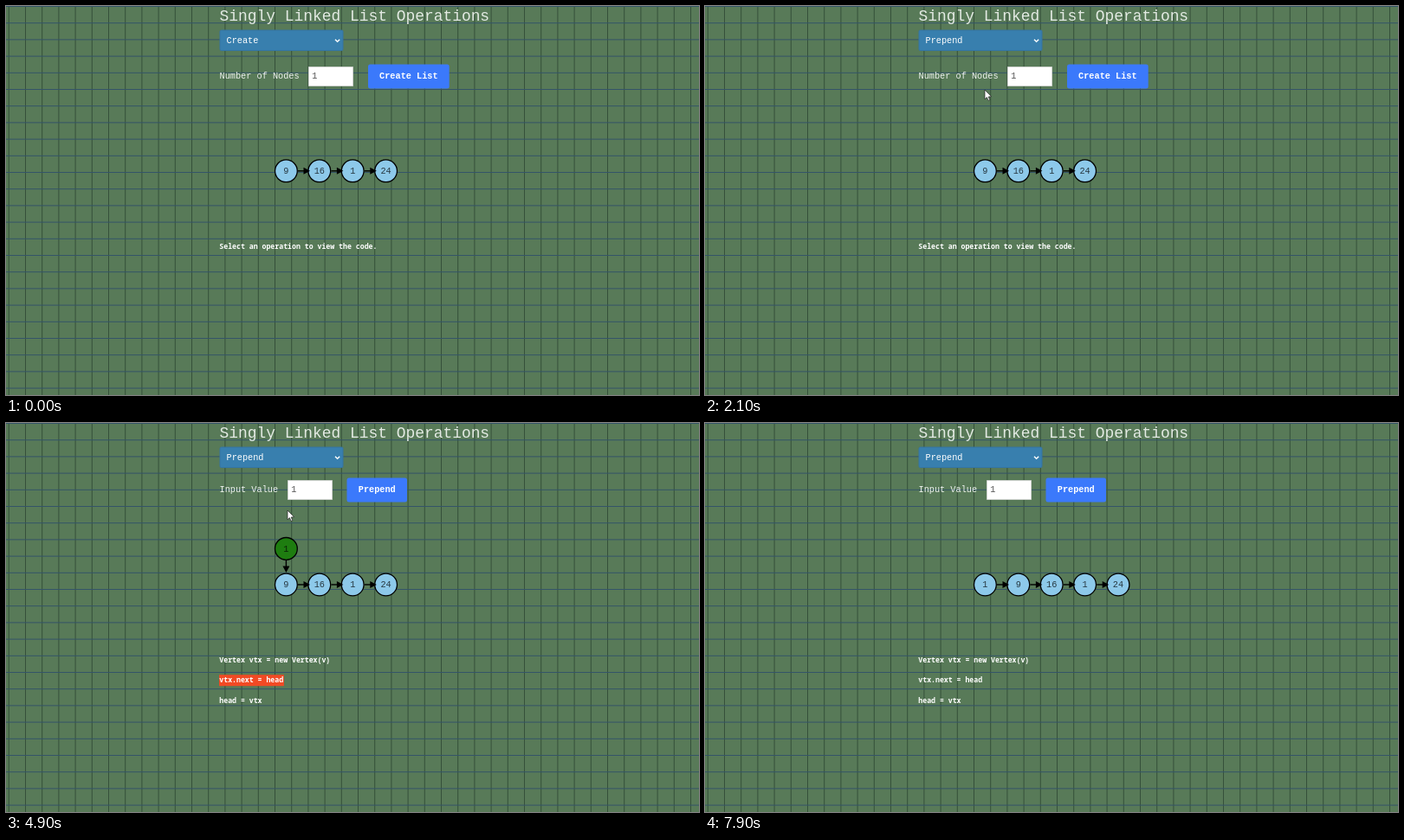
These frames come from a looping animation (800x450 px, 8.3 s). An HTML page with a canvas:

```html
<!DOCTYPE html>
<html lang="en">
<head>
<meta charset="utf-8">
<title>Singly Linked List Operations</title>
<style>
  html, body { margin: 0; width: 100%; height: 100%; overflow: hidden; background: #587a58; }
  canvas { display: block; }
</style>
</head>
<body>
<canvas id="stage" width="800" height="450"></canvas>
<script>
const ctx = document.getElementById('stage').getContext('2d');
const LOOP = 8300, TICK = 100, CLICK = 3130, STEP = 1003, FADE = 500, BLINK = 530;
const OPEN = 900, CLOSE = 2100, SWITCH = 2200;
const MONO = '"Liberation Mono", monospace', CODE = '"Noto Sans Mono", monospace';
const BLUE = [141, 201, 234], GREEN = [30, 125, 16];
const NODE_X = 323.4, GAP = 38.4, CELL = 19.2;
const OPTIONS = ['Select an Operation', 'Insert At Position', 'Prepend', 'Append', 'Search', 'Remove', 'Create'];
const LINES = ['Vertex vtx = new Vertex(v)', 'vtx.next = head', 'head = vtx'];

// Pointer stops: time, x, y
const PATH = [
  [200, 470, 190], [700, 342, 44], [1100, 338, 42], [1400, 334, 68], [1500, 333, 71],
  [1700, 332, 76], [1800, 328, 88], [1900, 323, 97], [2300, 323, 97], [2900, 422, 78.5],
  [4100, 422, 78.5], [4700, 325, 101], [5000, 325, 101], [5300, 131, 160]
];

const clamp = v => Math.max(0, Math.min(1, v));
const mix = (a, b, p) => a + (b - a) * p;
const rgb = (a, b, p) => `rgb(${a.map((v, i) => Math.round(mix(v, b[i], p))).join()})`;

// The standard "ease" curve, cubic-bezier(.25, .1, .25, 1)
function ease(x) {
  if (x <= 0 || x >= 1) return clamp(x);
  const bezier = (a, b, u) => 3 * a * u * (1 - u) ** 2 + 3 * b * u * u * (1 - u) + u ** 3;
  let lo = 0, hi = 1;
  for (let i = 0; i < 24; i++) {
    const mid = (lo + hi) / 2;
    if (bezier(.25, .25, mid) < x) lo = mid; else hi = mid;
  }
  return bezier(.1, 1, lo);
}

function pointerAt(t) {
  if (t < PATH[0][0] || t > PATH[PATH.length - 1][0]) return null;
  const i = Math.max(1, PATH.findIndex(p => p[0] >= t));
  const [t0, x0, y0] = PATH[i - 1], [t1, x1, y1] = PATH[i];
  const p = (t - t0) / (t1 - t0);
  return { x: mix(x0, x1, p), y: mix(y0, y1, p) };
}

function text(str, x, y, size, { color = '#fff', weight = 400, align = 'left', family = MONO } = {}) {
  ctx.font = `${weight} ${size}px ${family}`;
  ctx.textAlign = align;
  ctx.fillStyle = color;
  ctx.fillText(str, x, y);
}

function box(x, y, w, h, fill, radius = 0, stroke) {
  ctx.beginPath();
  ctx.roundRect(x, y, w, h, radius);
  ctx.fillStyle = fill;
  ctx.fill();
  if (stroke) {
    ctx.strokeStyle = stroke;
    ctx.lineWidth = 1;
    ctx.stroke();
  }
}

function polygon(points, fill, stroke) {
  ctx.beginPath();
  points.forEach(([x, y]) => ctx.lineTo(x, y));
  ctx.closePath();
  ctx.fillStyle = fill;
  ctx.fill();
  if (stroke) {
    ctx.strokeStyle = stroke;
    ctx.lineWidth = .7;
    ctx.stroke();
  }
}

function drawGrid() {
  ctx.fillStyle = '#587a58';
  ctx.fillRect(0, 0, 800, 450);
  ctx.fillStyle = '#35503a';
  for (let x = 2.8; x < 800; x += CELL) ctx.fillRect(x, 0, 1, 450);
  ctx.fillStyle = '#345468';
  for (let y = 0; y < 450; y += CELL) ctx.fillRect(0, y, 800, 1);
}

function drawSelect(value) {
  box(247, 28, 142, 23.5, '#387fae', 1.5, '#3575a2');
  text(value, 254.5, 43, 10.24);
  ctx.beginPath();
  ctx.moveTo(380, 38.7);
  ctx.lineTo(382.6, 41.3);
  ctx.lineTo(385.2, 38.7);
  ctx.strokeStyle = '#fff';
  ctx.lineWidth = 1.4;
  ctx.stroke();
}

function drawForm(label, inputX, buttonX, buttonW, caption, y, hover) {
  text(label, 246.5, y + 3.2, 10.24, { color: '#f0f4f0' });
  box(inputX + .5, y - 10.5, 51, 22, '#fff', 0, '#cdd1cd');
  text('1', inputX + 4.3, y + 3.2, 10.24, { color: '#555' });
  box(buttonX, y - 13.5, buttonW, 28, hover ? '#2552b5' : '#3b79fb', 2.5);
  text(caption, buttonX + buttonW / 2, y + 3.2, 10.24, { weight: 700, align: 'center' });
}

function drawMenu(active) {
  const row = 16.6, top = 52.5;
  ctx.save();
  ctx.shadowColor = 'rgba(0,0,0,.4)';
  ctx.shadowBlur = 14;
  ctx.shadowOffsetY = 4;
  box(247, 52, 142, 117, '#387fae', [0, 0, 4, 4]);
  ctx.restore();
  OPTIONS.forEach((option, i) => {
    const y = top + i * row;
    if (i === active) box(247, y, 142, row, '#335fd0');
    text(option, 255, y + 11.4, 10.24, { color: i ? '#fff' : '#47748d' });
  });
}

function drawArrow(x, y, angle) {
  ctx.save();
  ctx.translate(x, y);
  ctx.rotate(angle);
  ctx.fillStyle = '#000';
  ctx.fillRect(0, -.7, 9, 1.4);
  polygon([[6.5, -4], [14, 0], [6.5, 4]], '#000');
  ctx.restore();
}

function drawNode(value, x, y, fill) {
  ctx.beginPath();
  ctx.arc(x, y, 12.9, 0, Math.PI * 2);
  ctx.fillStyle = fill;
  ctx.fill();
  ctx.strokeStyle = '#000';
  ctx.lineWidth = 1.3;
  ctx.stroke();
  text(value, x, y + 3.3, 10.24, { color: 'rgba(0,0,0,.72)', align: 'center' });
}

function drawList(t, y) {
  const stage = Math.floor((t - CLICK) / STEP);
  const slide = ease((t - CLICK - 3 * STEP) / FADE);
  const tint = ease((t - CLICK - 4 * STEP) / FADE);
  [9, 16, 1, 24].forEach((v, i) => drawNode(v, NODE_X + GAP * (i + slide), y, rgb(BLUE, BLUE, 0)));
  if (stage >= 0) drawNode(1, NODE_X, mix(y - 41.6, y, slide), rgb(GREEN, BLUE, tint));
  for (let i = 0; i < (stage >= 3 ? 4 : 3); i++) drawArrow(NODE_X + 13.6 + GAP * i, y, 0);
  if (stage === 1 || stage === 2) drawArrow(NODE_X, y - 28, Math.PI / 2);
}

function drawCode(t) {
  const style = { weight: 700, family: CODE };
  if (t < SWITCH) {
    text('Select an operation to view the code.', 246.3, 280.7, 8.21, style);
    return;
  }
  const active = Math.floor((t - CLICK) / STEP);
  LINES.forEach((line, i) => {
    const y = 274 + 23.7 * i;
    if (i === active) box(246, y - 6.5, line.length * 4.926 + 1, 13.1, '#f14a24');
    text(line, 246.3, y + 2.7, 8.21, style);
  });
}

function drawPointer({ x, y }, hand) {
  ctx.save();
  ctx.translate(x, y);
  if (hand) {
    ctx.scale(1.1, 1.1);
    polygon([[-.9, 0], [1, 0], [1, 4], [5.6, 5.2], [6.2, 6.5], [5.5, 11], [4.6, 12.5],
      [-.3, 12.5], [-3.3, 8.3], [-3, 7], [-.9, 8]], '#fff', '#222');
  } else {
    polygon([[0, 0], [0, 10.8], [2.4, 8.6], [4.1, 12.4], [5.8, 11.6], [4.2, 8], [7.5, 7.7]], '#fff', '#222');
  }
  ctx.restore();
}

function draw(t) {
  const pointer = pointerAt(t), switched = t >= SWITCH;
  const hover = switched && pointer && pointer.x > 393.5 && pointer.y < 92;
  drawGrid();
  text('Singly Linked List Operations', 246.5, 17.2, 17.92, { color: '#e4ebe4' });
  drawSelect(t < CLOSE ? 'Create' : 'Prepend');
  if (switched) drawForm('Input Value', 325, 393.5, 69.5, 'Prepend', 77, hover);
  else drawForm('Number of Nodes', 349, 418, 93.7, 'Create List', 81, false);
  drawList(t, switched ? 187 : 190.8);
  drawCode(t);
  if (t >= OPEN && t < CLOSE) {
    const row = Math.floor((pointer.y - 52.5) / 16.6);
    drawMenu(row > 0 ? row : OPTIONS.length - 1);
  }
  if (t >= CLICK && Math.floor((t - CLICK) / BLINK) % 2 === 0) box(246.5, 27.5, 1, 24.5, '#fff');
  if (pointer) drawPointer(pointer, hover);
}

function frame() {
  const t = performance.now() % LOOP;
  draw(Math.min(Math.floor(t / TICK) * TICK, 7900));
  requestAnimationFrame(frame);
}
frame();
</script>
</body>
</html>
```
